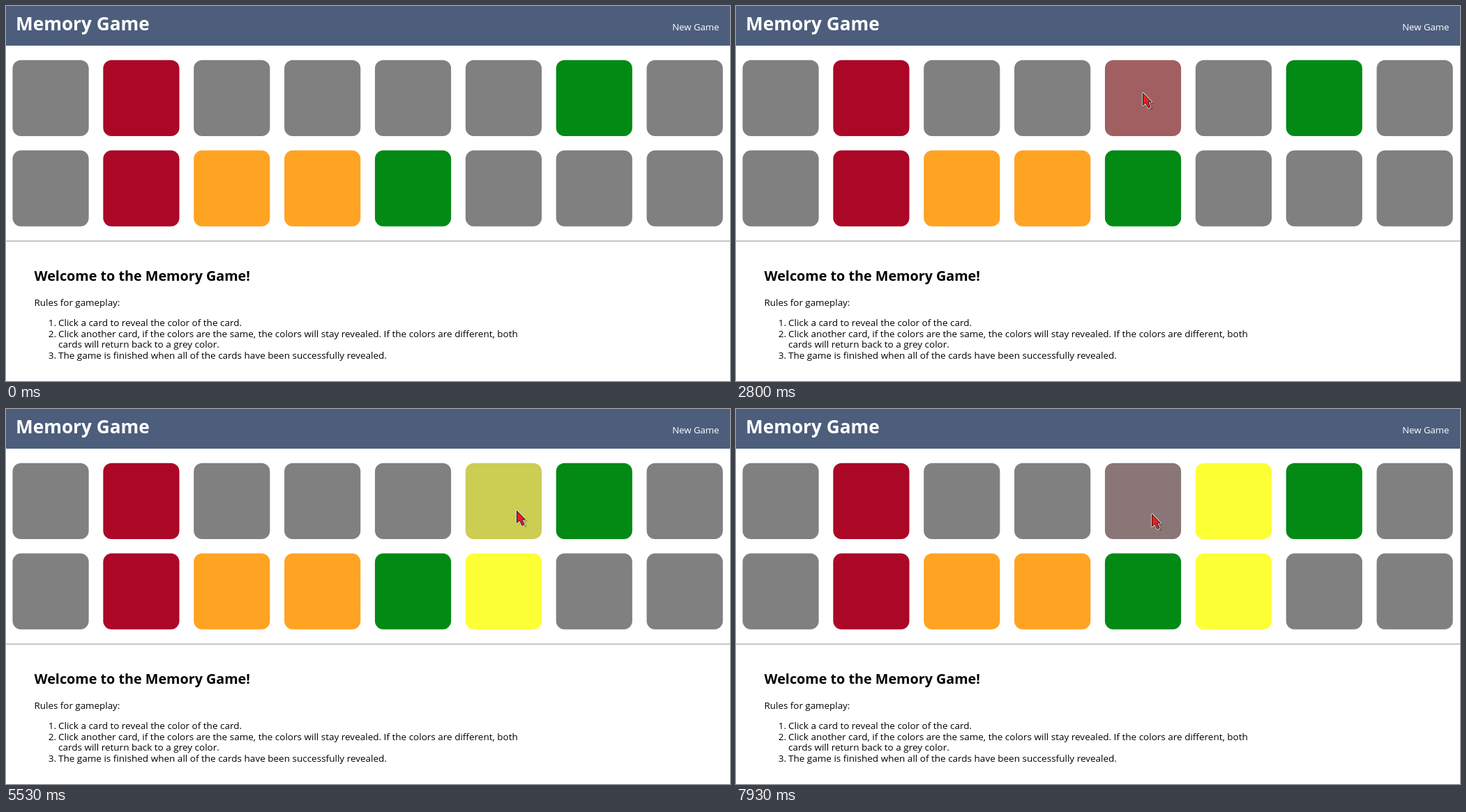
These frames come from a looping animation (1038 by 539 pixels, 8 s). An HTML page:

```html
<!DOCTYPE html>
<html lang="en">
<head>
<meta charset="utf-8">
<title>Memory Game</title>
<style>
  html, body { margin: 0; height: 100%; overflow: hidden; background: #fff; }
  svg { display: block; width: 100vw; height: 100vh; }
  text { font: 13.52px "Open Sans", "Noto Sans", sans-serif; }
  .bold { font-weight: 700; }
  .light { fill: #fff; }
</style>
</head>
<body>
<svg viewBox="0 0 1038 539">
  <defs><path id="arrow" d="M.5 .5V17.5L4.5 14.2 8 21.5 11 20 7.7 13H12.5Z"/></defs>
  <rect width="1038" height="57" fill="#4d5e7c"/>
  <text class="bold light" x="14" y="35" style="font-size:26.2px">Memory Game</text>
  <text class="light" x="1022.5" y="35" text-anchor="end" style="font-size:13.2px">New Game</text>
  <g id="cards"></g>
  <rect y="337" width="1038" height="1.7" fill="#bdbdbd"/>
  <text class="bold" x="40.5" y="395" style="font-size:19.75px">Welcome to the Memory Game!</text>
  <text x="40.5" y="431" style="font-size:13.4px">Rules for gameplay:</text>
  <g text-anchor="end">
    <text x="72" y="460">1.</text>
    <text x="72" y="475.7">2.</text>
    <text x="72" y="507">3.</text>
  </g>
  <text x="75" y="460">Click a card to reveal the color of the card.</text>
  <text x="75" y="475.7">Click another card, if the colors are the same, the colors will stay revealed. If the colors are different, both</text>
  <text x="75" y="491.3">cards will return back to a grey color.</text>
  <text x="75" y="507">The game is finished when all of the cards have been successfully revealed.</text>
  <g id="cursor" stroke-linejoin="round">
    <use href="#arrow" x="4" y="3" opacity=".2"/>
    <use href="#arrow" stroke="#ddd" stroke-width="2.6"/>
    <use href="#arrow" fill="#e8201f" stroke="#2a1414"/>
  </g>
</svg>
<script>
const LOOP = 8000, TICK = 200 / 3, FADE = 500;
const MOVE = 400, PAUSE = 150;   // the pointer's travel time, and its wait before a click
const PITCH = 129.87;            // distance between neighbouring cards
const RED = '#ff0008', YELLOW = '#fdff35', CRIMSON = '#ab0828',
      GREEN = '#038a15', ORANGE = '#ffa322', GREY = '#808080';

// Cards are numbered 0-7 in the top row and 8-15 in the bottom row
const matched = { 1: CRIMSON, 9: CRIMSON, 6: GREEN, 12: GREEN, 10: ORANGE, 11: ORANGE };

// Pointer stops; those with a color click the card below them
const stops = [
  { at: 845, x: 848, y: 269, color: '#2700ea', hide: 2200 },
  { at: 1650, x: 662, y: 290 },
  { at: 2708, x: 583, y: 125, color: RED, hide: 3960 },
  { at: 3655, x: 706, y: 153, color: YELLOW, hide: 3960 },
  { at: 4600, x: 715, y: 263, color: YELLOW },
  { at: 5358, x: 732, y: 146, color: YELLOW },
  { at: 6290, x: 965, y: 162, color: '#ffb8ca', hide: 7430 },
  { at: 6740, x: 925, y: 197 },
  { at: 7130, x: 968, y: 250, color: RED, hide: 7430 },
  { at: 7890, x: 596, y: 151, color: RED }
];

const cards = Array.from({ length: 16 }, (_, i) => {
  const card = document.createElementNS('http://www.w3.org/2000/svg', 'rect');
  const box = {
    x: 9.45 + i % 8 * PITCH, y: 77.75 + Math.floor(i / 8) * PITCH,
    width: 109.2, height: 109.2, rx: 12
  };
  for (const key in box) card.setAttribute(key, box[key]);
  document.getElementById('cards').append(card);
  return card;
});
const cursor = document.getElementById('cursor');

// The CSS "ease" curve
function ease(p) {
  if (p <= 0) return 0;
  if (p >= 1) return 1;
  const bezier = (s, a, b) => 3 * a * s * (1 - s) ** 2 + 3 * b * s * s * (1 - s) + s ** 3;
  let lo = 0, hi = 1;
  for (let i = 0; i < 20; i++) {
    const mid = (lo + hi) / 2;
    if (bezier(mid, .25, .25) < p) lo = mid; else hi = mid;
  }
  return bezier(lo, .1, 1);
}

// The screen refreshes every tick, freezes for a while, then refreshes every fourth tick
function refreshTime(t) {
  const tick = Math.floor((t + 5) / TICK);
  if (tick < 42) return Math.min(tick, 25) * TICK;
  return Math.max(42, tick - (tick + 1) % 4) * TICK;
}

function cardAt(x, y) {
  return cards[Math.floor(x / PITCH) + (y > 197 ? 8 : 0)];
}

function draw(now) {
  const t = refreshTime(now % LOOP);
  let px = 1060, py = 249;
  cards.forEach((card, i) => card.style.fill = matched[i] || GREY);
  for (const { at, x, y, color, hide = Infinity } of stops) {
    const k = ease((t - at + PAUSE + MOVE) / MOVE);
    px += (x - px) * k;
    py += (y - py) * k;
    const shown = ease((t - at) / FADE) - ease((t - hide) / FADE);
    if (color && shown > 0)
      cardAt(x, y).style.fill = `color-mix(in srgb, ${color} ${shown * 100}%, ${GREY})`;
  }
  cursor.setAttribute('transform', `translate(${px} ${py})`);
}

let start;
function frame(now) {
  start ??= now;
  draw(now - start);
  requestAnimationFrame(frame);
}
draw(0);
requestAnimationFrame(frame);
</script>
</body>
</html>
```
